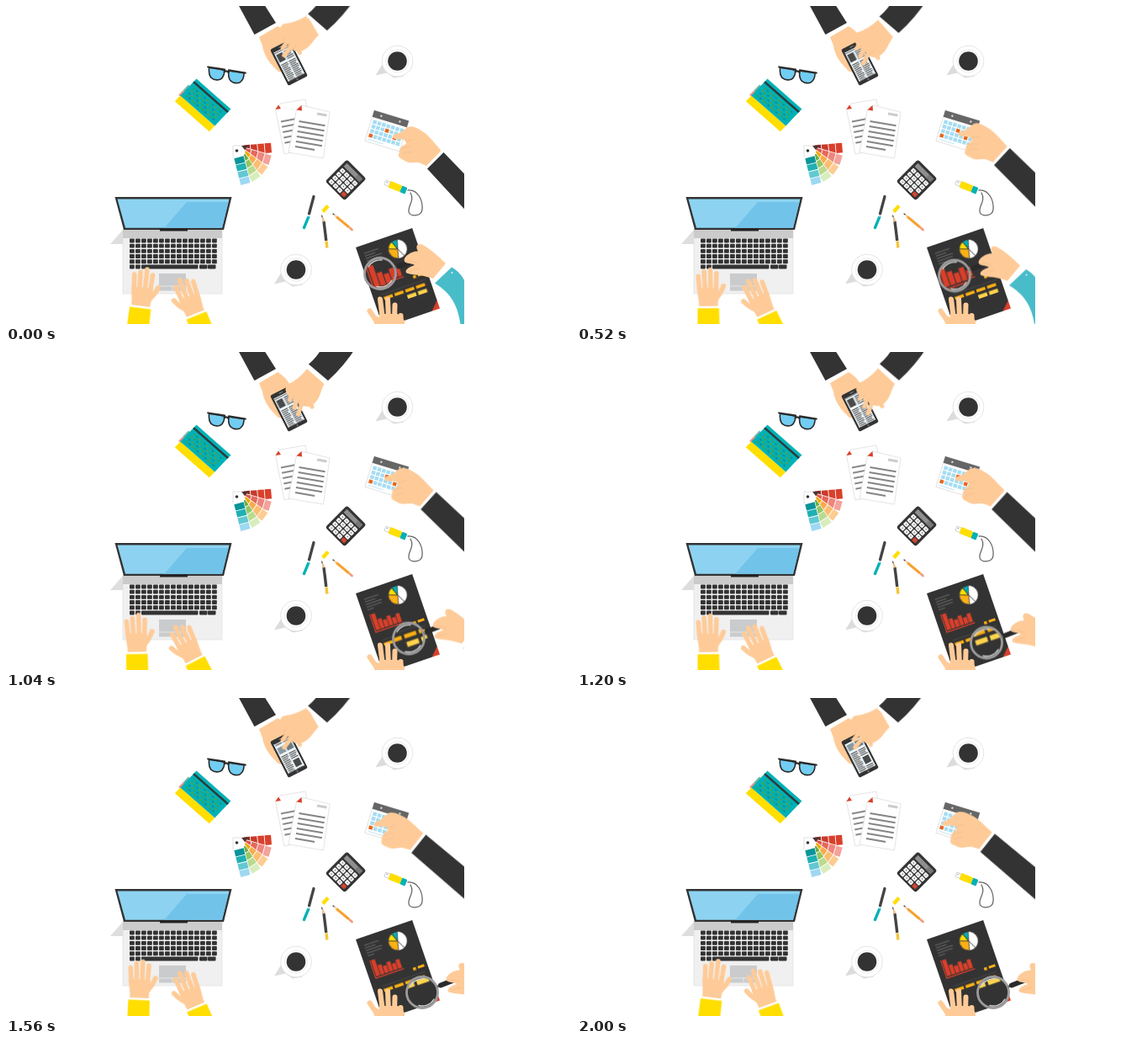
An HTML page that plays this animation: 672x378 px, repeating every 2.04 s.

```html
<!DOCTYPE html>
<html lang="en">
<head>
<meta charset="utf-8">
<title>Desk from above</title>
<style>
html, body { margin: 0; width: 100%; height: 100%; overflow: hidden; background: #fff; }
svg { display: block; width: 672px; height: 378px; }
</style>
</head>
<body>
<svg id="stage" viewBox="0 0 672 378" xmlns="http://www.w3.org/2000/svg"></svg>
<script>
const LOOP = 2040;
const SKIN = '#fecb98', CREASE = '#f0bb8a', DARK = '#333', TEAL = '#00b1b5', YELLOW = '#ffde00';
const ORANGE = '#fbb014', RED = '#d9402b', SKY = '#8dd3f1', PAPER = '#fff', EDGE = '#d4d4d4';

const path = (d, fill, extra = '') => `<path d="${d}" fill="${fill}" ${extra}/>`;
const line = (d, color, w, cap = 'round') =>
  `<path d="${d}" fill="none" stroke="${color}" stroke-width="${w}" stroke-linecap="${cap}" stroke-linejoin="round"/>`;
const rect = (x, y, w, h, fill, extra = '') =>
  `<rect x="${x}" y="${y}" width="${w}" height="${h}" fill="${fill}" ${extra}/>`;
const disc = (x, y, r, fill, extra = '') => `<circle cx="${x}" cy="${y}" r="${r}" fill="${fill}" ${extra}/>`;
const group = (transform, body, extra = '') => `<g transform="${transform}" ${extra}>${body}</g>`;
const part = (id, body) => `<g id="${id}">${body}</g>`;
const rep = (n, fn) => Array.from({ length: n }, (_, i) => fn(i)).join('');

function cup(x, y) {
  return group(`translate(${x} ${y})`,
    path('M-18 4L-26 17L-13 14L-4 20L8 18Z', '#dcdcdc') +
    disc(0, 0, 18.3, '#fff', 'stroke="#dedede" stroke-width=".8"') +
    disc(0, 0, 13.6, '#fff', 'stroke="#e6e6e6" stroke-width=".7"') +
    disc(0, 0, 11.3, DARK));
}

function glasses() {
  const lens = x => path(`M${x} 2h18.500q1 8 -3 11.500q-6 3.500 -11.500 0q-4 -4 -4 -11.500Z`, '#72cdf2', 'stroke="#2b2b2b" stroke-width="1.600"');
  return group('translate(240.500 71) rotate(9)',
    lens(1.5) + lens(25) +
    line('M0 1.500H20M25 1.500H45M20 4Q22.500 2 25 4', '#2b2b2b', 2.2));
}

function notebook() {
  const inks = ['#3aa05a', '#0a8f98', '#5f9f3a'];
  return group('matrix(.745 .655 -.735 .765 226.500 86.500)',
    rect(-2, 20, 8, 7, '#ef8f86') + rect(-2, 11, 6, 9, '#6fb5a5') +
    rect(0, 26, 55, 9, YELLOW) +
    rect(0, 0, 55, 26, TEAL) + rect(0, 3.500, 55, 2.4, '#2f3a3c') +
    rep(4, r => rep(11, c => rect(5 + c * 4.2, 9 + r * 3.9, 2.7, 1.8, inks[(r * 2 + c) % 3]))));
}

function papers() {
  const page = 'stroke="#d8d8d8" stroke-width=".7"';
  return path('M326 116L356 111L367 169L331 176L320.500 123Z', PAPER, page) +
    path('M320.500 123L324 117.500L327 122Z', RED) +
    rep(5, i => line(`M${327 + i * 1.1} ${137.5 + i * 6.3}l18 -3.500`, '#8a8a8a', 2, 'butt')) +
    path('M352 118L385 126L377.500 181L336 174L345.500 123Z', PAPER, page) +
    path('M345.500 123.500L351.500 118L352 124.500Z', RED) +
    line('M370 128l11.500 2', '#ccc', 3, 'butt') +
    rep(6, i => line(`M${348.5 - i * .9} ${137 + i * 6}l${i == 5 ? 23 : 31} ${i == 5 ? 4 : 5.3}`, '#858585', 2, 'butt'));
}

function swatches() {
  const blades = [
    [-5, ['#8c2c26', '#c93a2b', '#d9402b', '#d9402b']],
    [16, ['#dc5a48', '#e5685c', '#ee857b', '#f3a39a']],
    [36, ['#f0a800', '#f8ac4c', '#fbbd72', '#fdcc92']],
    [56, ['#6aae45', '#94c662', '#b9db90', '#d8edbd']],
    [76, ['#0a949a', '#1fb0b3', '#62c8d2', '#9ed8f2']]
  ];
  return group('translate(275 172)', blades.map(([a, tones]) => group(`rotate(${a})`,
    rect(-5, -6.500, 47, 13, '#fff') +
    tones.map((c, i) => rect(8 + i * 8.4, -5.8, 7.5, 11.6, c)).join(''))).join('') +
    path('M5 -6H13L9 -1Z', '#4a3332') +
    line('M-5 8V-6H5', EDGE, .7) + disc(0, 0, 4, '#fff') + disc(-.5, 0, 1.8, DARK));
}

function calendar() {
  const marked = ['3,1', '5,2', '0,3'];
  return group('translate(438 124) rotate(17)',
    rect(0, 0, 43, 38, '#fff', 'stroke="#d8d8d8" stroke-width=".7"') +
    rect(0, 0, 43, 8, '#666') + disc(10, 4, 1.2, '#ddd') + disc(33, 4, 1.2, '#ddd') +
    rep(4, r => rep(7, c => rect(2.5 + c * 5.6, 11 + r * 5.6, 4.5, 4.4,
      marked.includes(`${c},${r}`) ? '#e8661b' : '#a5dcf3'))) +
    line('M3 35H22', '#c9e6f2', 1, 'butt'));
}

function calculator() {
  return group('translate(405.500 182.500) rotate(45)',
    rect(0, 0, 32.5, 36.5, DARK, 'rx="3"') +
    rect(3, 3, 26.5, 5.5, '#8f8f8f') + rect(22, 3, 7.500, 5.5, '#777') +
    rep(4, r => rep(4, c => rect(3 + c * 6.9, 10.7 + r * 6.2, 5.7, 5, r * c == 9 ? RED : '#f4f4f4', 'rx="1"') +
      rect(5.3 + c * 6.9, 12.5 + r * 6.2, 1.3, 1.3, '#777'))));
}

function stationery() {
  return line('M366 226.500L360.500 247', '#444', 3.3) + line('M359.700 251L354.500 263.500', TEAL, 3.3) +
    line('M360.300 248.500l-.6 2', '#fff', .8) +
    line('M376.800 244.500L383 237.500', YELLOW, 4.3, 'butt') +
    line('M378 256L380.800 279', '#444', 3.4, 'butt') + line('M381 279.500l.9 8', '#f3c63b', 3.4, 'butt') +
    path('M375.500 248L376.300 256.500L379.700 256Z', '#e8c090') + line('M375.700 249l.3 2', DARK, 1) +
    line('M393 250.500L408 263', '#f6a12f', 3, 'butt') + line('M409 263.800l2.500 2.200', '#ef9d7c', 2.8) +
    path('M388.500 246.500L394 249.300L392 251.800Z', '#f3d2a8') + line('M389 247l1 .8', DARK, 1.2);
}

function usb() {
  return line('M478 219C490 218 496 231 495 242C494 250.500 482 250 479.500 246C476 239 487 232 481 222', '#666', 1.3) +
    group('translate(457.500 208) rotate(22)',
      rect(-5.500, 1.200, 6, 5.600, '#fff', 'stroke="#c4c4c4" stroke-width=".7"') + rect(-4, 2.500, 1.3, 1.300, '#999') +
      rect(0, 0, 15, 8.2, YELLOW, 'rx="1"') + rect(15, 0, 6.500, 8.2, TEAL, 'rx="1"'));
}

function laptop() {
  return path('M140 265L124 283H140Z', '#dedede') +
    rect(139, 265, 118, 77, '#f0f0f0', 'stroke="#dedede" stroke-width=".7"') +
    rect(139, 265, 118, 11, '#cbcbcb') +
    path('M129.500 227H268.500L259 266H140Z', DARK) +
    path('M132.500 229.500H265.500L257 263.800H142Z', SKY) +
    path('M215 233H264.500L257 263.800H188Z', '#72c3ea') +
    rect(183, 264.5, 33, 3, '#222') +
    rep(6, r => rep(r == 5 ? 5 : 15, c => {
      const wide = r == 5 && c == 2;
      const x = r < 5 ? 147 + c * 7 : [147, 154, 161, 230, 240][c];
      const w = r < 5 ? 5.8 : wide ? 67.5 : c > 2 ? 9.5 : 5.8;
      return rect(x, 276.5 + r * 6.2, w, 4.9, DARK, 'rx=".8"');
    })) +
    rect(182, 318, 32, 20.5, '#c9cbcd') + line('M182 333H214M198 333v5', '#eee', .8);
}

function typingHand(sleeve) {
  const fingers = [[-10.5, -12, -38.5], [-4, -5, -43], [2.6, 2.4, -46], [9, 9.8, -41]];
  return path('M-11.500 -1C-10.500 -9 -13.500 -14 -13.300 -24H11.800C12.500 -16 11.500 -9 11 -1Z', SKIN) +
    fingers.map(([x, tip, y], i) =>
      `<g class="finger${i % 2}">${line(`M${x} -22L${tip} ${y}`, SKIN, 5.6)}</g>`).join('') +
    line('M7 -9Q14 -15 18 -26', SKIN, 5.8) +
    path('M-12 -2H12V1H-12Z', '#fff') + path('M-13 .500H12.500L13 32H-13.500Z', sleeve);
}

function report() {
  const bars = [20, 12, 9, 12, 8, 11];
  const slice = (a, b, c) => {
    const p = t => `${(11 * Math.cos(t)).toFixed(2)} ${(11 * Math.sin(t)).toFixed(2)}`;
    return path(`M0 0L${p(a)}A11 11 0 0 1 ${p(b)}Z`, c, 'stroke="#333" stroke-width=".8"');
  };
  return group('translate(416 287) rotate(-19)',
    rect(0, 0, 71, 101, DARK) + path('M71 91V101H61Z', RED) +
    rep(5, i => line(`M7 ${10 + i * 3.3}h${[18, 13, 20, 19, 8][i]}`, '#777', .8, 'butt')) +
    group('translate(46.500 18)', disc(0, 0, 11, '#fff') +
      slice(1.8, 3.5, ORANGE) + slice(3.5, 4.35, YELLOW) + slice(4.35, 5, TEAL) + line('M0 0L5 10', DARK, .8)) +
    rect(7, 29, 1.2, 23, RED) + rect(7, 50.8, 36, 1.3, RED) +
    bars.map((h, i) => rect(9 + i * 5.5, 49.5 - h, 4.7, h, RED)).join('') +
    rect(53, 54, 3.5, 3.5, ORANGE) + rect(59, 54, 8, 3, ORANGE) +
    rep(4, i => rect(12 + i * 13.5, 66.5, 11, 3.6, ORANGE)) +
    rep(2, i => rect(39 + i * 13.5, 73.5, 11, 4.5, '#ffd34d')) +
    line('M11 63H66', '#555', .6, 'butt'));
}

function restingHand() {
  return path('M436 367L444 370V366H466L474 374V382H439Z', SKIN) +
    line('M448 372L445 348.500M455 372L454 348.500M462 374L462.500 355.500M470 378L469.500 368M441 375L432.500 362.500', SKIN, 6);
}

// Lens centre and zoom; the inner copy moves against the glass.
const LENS = [445, 318], ZOOM = 1.35;
function magnifier() {
  const [x, y] = LENS;
  const view = group(`translate(${x} ${y}) scale(${ZOOM}) translate(${-x} ${-y})`, '<use href="#report"/>');
  return `<g clip-path="url(#lensClip)">${rect(x - 20, y - 20, 40, 40, '#eee')}${part('lensView', view)}</g>` +
    disc(x, y, 18.5, 'none', 'stroke="#9c9c9c" stroke-width="2.800"') +
    line(`M${x - 14} ${y - 8}A16 16 0 0 1 ${x + 2} ${y - 16}M${x + 14} ${y + 8}A16 16 0 0 1 ${x - 4} ${y + 15.5}`, '#d5d5d5', 1.4) +
    line(`M${x + 18.5} ${y - 7}L${x + 22} ${y - 8.5}`, '#777', 3) +
    line(`M${x + 22} ${y - 8.5}L${x + 36} ${y - 14}`, '#2a2a2a', 6) +
    path('M523 306C514 297 505 289 495 283.500C488 281 487 287 490 291.500C483 291 474 297 473.500 302C474 307 481 305 486 308C480 310 473 314 476.500 317.500C483 320 491 319 497 321L508 324Z', SKIN) +
    line('M476 304Q483 302 489 306M480 316Q486 312 491 312', CREASE, .7) +
    path('M510 329.500L530 310.500C546 320 553 335 557 382H541C538 356 529 341 510 329.500Z', '#49bcc9') +
    disc(530.5, 317, 1, '#e9f7f8');
}

function phone() {
  const text = (x, y, w, n) => rep(n, i => rect(x, y + i * 2.3, w - (i % 3 == 2 ? 1.5 : 0), 1.1, '#4a4a4a'));
  const block = (x, y, w, h, c = '#4a4a4a') => rect(x, y, w, h, c);
  const strip = rect(0, 1, 22, 1.3, '#777') + block(1.5, 4, 8, 10) + text(11.5, 4, 9, 5) +
    text(1.5, 17, 8.5, 10) + text(11.5, 17, 9, 10) +
    block(1.5, 42, 9, 8, '#8a9aa0') + block(12, 42, 8.5, 8, '#6d7a80') +
    text(1.5, 53, 8.5, 12) + text(11.5, 53, 9, 4) + block(12, 63, 8, 9) + text(11.5, 74, 9, 3);
  return group('translate(336.500 67.500) rotate(-27)',
    rect(-13, -24, 26, 48, DARK, 'rx="2"') +
    group('translate(-11 -19)', rect(0, 0, 22, 39, '#edf5f8') + part('strip', strip), 'clip-path="url(#screenClip)"') +
    rect(-2.5, -22, 5, 1, '#888') + disc(0, 22, 1, '#888'));
}

function holdingHand() {
  return path('M301 37L323 24C330 27 338 37 340 44L331 78Q324 80 321 75C312 67 306 56 305 47Z', SKIN) +
    path('M276 -2H307L321 20L295.500 34Z', DARK) + line('M296.500 36L322.500 22', '#fff', 2.2, 'butt');
}

function swipingHand() {
  return path('M358 20L378.500 38C374 46 374 55 366 62C361 66 357 66 350 62L340 55C332 50 330 42 336 38C343 35 351 29 358 20Z', SKIN) +
    line('M340 50L337.500 57M346 56L343 66M353 58L347.500 74M361 60L364 65', SKIN, 5) +
    line('M342.800 52l-2 6M349.500 57l-3 9M357 58l-3 6', CREASE, .6);
}

function pointingHand() {
  return path('M517.500 172C509 162 503 154 496 149.500C488 144 483 142 478 144C473 147 470 151 464 152C459 152.500 458.500 157.500 463 158C468 158.500 471 158 475 160L476 164C471 166 468 169 467.500 175C465 179 469 181 474 184C480 188 486 185 492 186.500L500 190Z', SKIN) +
    line('M475 160Q481 161 485 158M471 175Q477 173 482 174M470 170Q476 166 482 168', CREASE, .7) +
    path('M501 193.500L520.500 174L590 246V290Z', DARK);
}

document.getElementById('stage').innerHTML =
  `<defs>
    <clipPath id="page"><path d="M0 0H545V378H0Z"/></clipPath>
    <clipPath id="lensClip"><circle cx="${LENS[0]}" cy="${LENS[1]}" r="18.500"/></clipPath>
    <clipPath id="screenClip"><path d="M0 0H22V39H0Z"/></clipPath>
  </defs>
  <g clip-path="url(#page)">` +
  cup(465.5, 65.5) + cup(345, 313.5) + glasses() + notebook() + papers() + swatches() +
  calendar() + calculator() + stationery() + usb() + laptop() +
  part('left', typingHand(YELLOW)) +
  part('right', group('scale(-1 1)', typingHand(YELLOW))) +
  part('report', report()) + part('glass', magnifier()) + restingHand() +
  holdingHand() + phone() + part('swipe', swipingHand()) +
  part('cuff', path('M360 14.500L383 34Q403 16 418 -8H378Q370 6 360 14.500Z', DARK) + line('M358.500 17L381 36', '#fff', 2, 'butt')) +
  part('point', pointingHand()) + '</g>';

// Rows: time, x, y, angle, easing to the next row.
function move(el, rows, origin = '0 0') {
  el.style.transformOrigin = origin;
  const last = rows[rows.length - 1];
  const frames = (last[0] < LOOP ? [...rows, [LOOP, ...last.slice(1)]] : rows).map(([t, x, y, r = 0, easing = 'linear']) =>
    ({ offset: t / LOOP, transform: `translate(${x}px,${y}px) rotate(${r}deg)`, easing }));
  el.animate(frames, { duration: LOOP, iterations: Infinity });
}
const byId = id => document.getElementById(id);
const SMOOTH = 'ease-in-out';

const glide = [[0, 0, 0], [240, 0, 0], [320, 1, .5], [520, 4, 2.5], [720, 11.5, 7.5], [880, 22, 14.5],
  [1040, 34, 22.5], [1200, 42, 27.500], [1360, 47, 31], [1560, 50, 32]];
move(byId('glass'), glide);
move(byId('lensView'), glide.map(([t, x, y]) => [t, -ZOOM * x, -ZOOM * y]));

move(byId('left'), [[0, 160, 358.5, 7, SMOOTH], [320, 157, 359, 0], [720, 156, 358.5, -1],
  [1040, 156, 358.5, -1], [1360, 157, 359, 0], [1560, 158.5, 358.5, 2.5], [2000, 160, 358, 7]]);
move(byId('right'), [[0, 226, 367.5, -22], [320, 226, 367, -24], [720, 224.5, 367, -26],
  [1040, 224.5, 367, -27], [1360, 226, 368, -24], [1560, 226.5, 368, -23], [2000, 227.5, 366.5, -20]]);

const swipe = (x, y, r) => [[0, x, y, r], [320, x, y, r, SMOOTH], [680, 0, 0, 0],
  [1120, 0, 0, 0, SMOOTH], [1540, x, y, r]];
move(byId('swipe'), swipe(-2, -5, 19), '371px 25px');
move(byId('cuff'), swipe(-1, -5, 1), '371px 25px');
move(byId('strip'), [[0, 0, 0], [1140, 0, 0, 0, SMOOTH], [1680, 0, -40]]);

move(byId('point'), [[0, 0, 0, 0], [280, 0, 0, 0, SMOOTH], [680, -8, -7, -3], [1320, -8.5, -7, -3, SMOOTH],
  [1600, -20.5, -10.5, -6.5], [2000, -22.5, -11.5, -6.5]], '510px 183px');

// Light tapping of alternate fingers.
[0, 1].forEach(k => document.querySelectorAll('.finger' + k).forEach(el =>
  move(el, Array.from({ length: 13 }, (_, i) => [i * LOOP / 12, 0, i % 2 == k ? 0 : 1]))));
</script>
</body>
</html>
```
